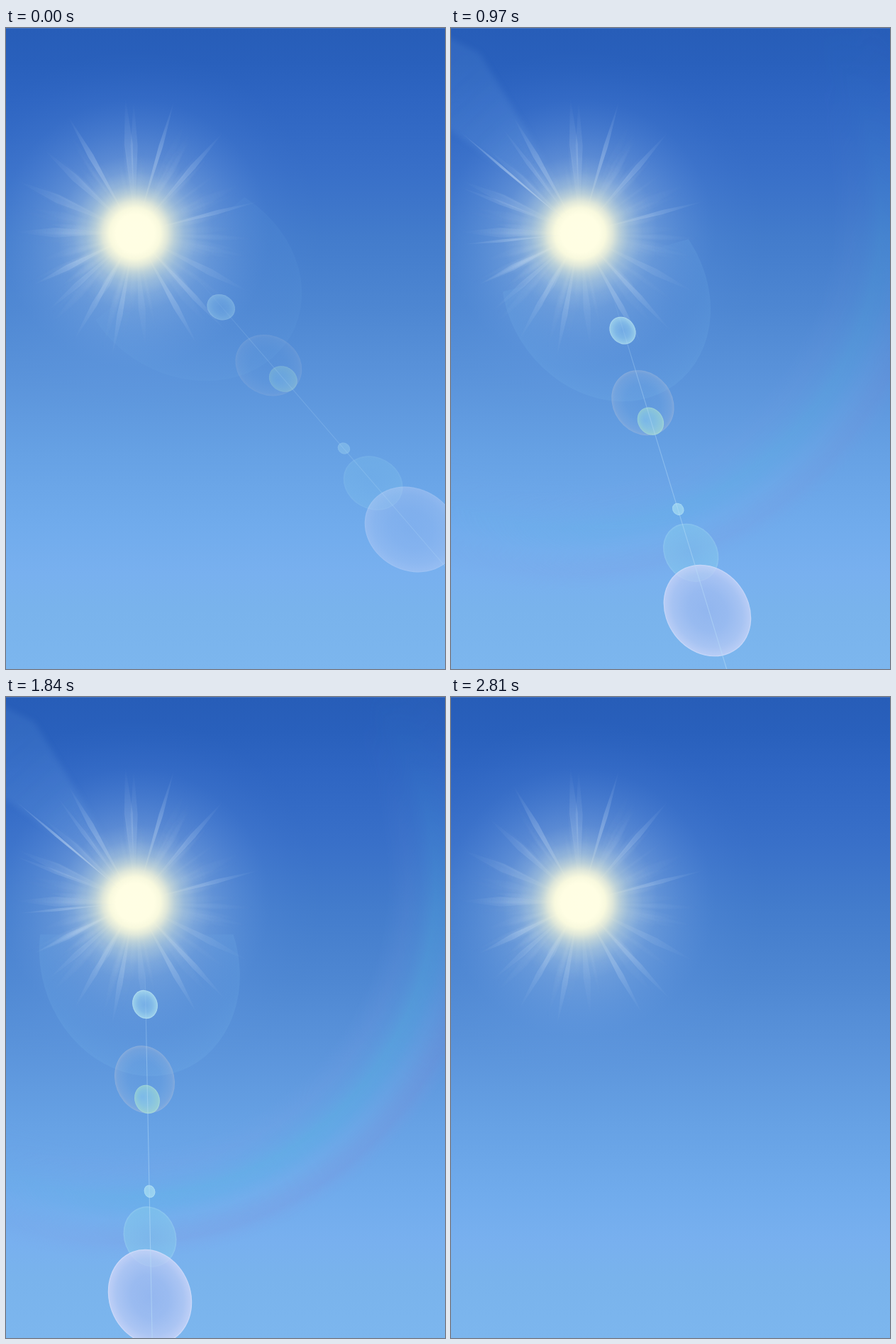
Animation of 619x905 px, one loop 4810 ms. Source, as an HTML page with a canvas:

```html
<!DOCTYPE html>
<html lang="en">
<head>
<meta charset="utf-8">
<title>Sun with lens flare</title>
<style>
  html, body { margin: 0; width: 100%; height: 100%; overflow: hidden; background: #5b94db; }
  canvas { display: block; }
</style>
</head>
<body>
<canvas id="stage" width="619" height="905"></canvas>
<script>
const W = 619, H = 905, LOOP = 4810, TAU = Math.PI * 2, DEG = Math.PI / 180;
const SUN = { x: 182, y: 290 };
const PIVOT = { x: 194.3, y: 265.3 };
const ctx = document.getElementById('stage').getContext('2d');

// Flare poses: start time and opacity; each turns a little further round the pivot.
const POSES = [
  [0, .42], [330, .56], [660, .72], [970, .88], [1270, .95],
  [1570, .95], [1870, .8], [2170, .6], [2480, .42], [2810, 0]
];
const STEP = 7.92, FIRST = -39.6, TILT = -21;
const BOW = { x: 165, y: 265, start: 790, peak: 1480, end: 2170 };

function layer(paint) {
  const c = document.createElement('canvas');
  c.width = W;
  c.height = H;
  paint(c.getContext('2d'));
  return c;
}

function addStops(gradient, stops, scale = 1) {
  for (const [at, color] of stops) gradient.addColorStop(at / scale, color);
  return gradient;
}

function seeded(seed) {
  return () => (seed = (seed * 16807) % 2147483647) / 2147483647;
}

function glow(g, radius, stops) {
  g.fillStyle = addStops(g.createRadialGradient(SUN.x, SUN.y, 0, SUN.x, SUN.y, radius), stops, radius);
  g.fillRect(0, 0, W, H);
}

// A spindle of light that leaves the sun and tapers to its tip.
function ray(g, angle, length, width, alpha) {
  const grad = g.createRadialGradient(0, 0, 0, 0, 0, length);
  addStops(grad, [
    [0, 'rgba(215,230,240,0)'],
    [.25, `rgba(215,230,240,${alpha * .6})`],
    [.55, `rgba(200,222,245,${alpha})`],
    [1, 'rgba(180,210,245,0)']
  ]);
  g.save();
  g.translate(SUN.x, SUN.y);
  g.rotate(angle);
  g.fillStyle = grad;
  g.beginPath();
  g.moveTo(25, 0);
  g.lineTo(length * .65, -width);
  g.lineTo(length, 0);
  g.lineTo(length * .65, width);
  g.fill();
  g.restore();
}

function rayTo(g, [x, y, width, alpha]) {
  const dx = x - SUN.x, dy = y - SUN.y;
  ray(g, Math.atan2(dy, dx), Math.hypot(dx, dy), width, alpha);
}

const sky = layer(g => {
  g.fillStyle = addStops(g.createLinearGradient(0, 0, 0, H), [
    [0, '#275db8'], [50, '#2960bc'], [100, '#2e65c2'], [200, '#386fc8'],
    [300, '#437ccc'], [400, '#4e87d2'], [500, '#5b94db'], [600, '#66a1e4'],
    [700, '#70abec'], [770, '#78b0ef'], [820, '#79b3ec'], [905, '#7cb6ee']
  ], H);
  g.fillRect(0, 0, W, H);
  g.fillStyle = 'rgba(255,255,255,.13)';
  g.fillRect(0, 0, W, 1);

  glow(g, 260, [
    [0, 'rgba(190,215,235,.55)'], [75, 'rgba(180,208,236,.44)'],
    [110, 'rgba(165,198,238,.32)'], [150, 'rgba(145,186,240,.19)'],
    [190, 'rgba(125,172,240,.07)'], [230, 'rgba(120,168,240,.02)'], [260, 'rgba(120,168,240,0)']
  ]);

  const rnd = seeded(4127);
  g.filter = 'blur(1px)';
  for (let i = 0; i < 80; i++) {
    ray(g, rnd() * TAU, 115 + rnd() * 65, 1.5 + rnd() * 6, .03 + rnd() * .07);
  }
  g.filter = 'blur(.6px)';
  [
    [86, 122, 4, .3], [238, 100, 3, .32], [308, 145, 4, .25], [168, 96, 6, .2], [180, 100, 5, .17],
    [360, 244, 3, .24], [36, 364, 4, .28], [56, 402, 4, .18], [94, 444, 4, .22], [149, 466, 4, .24],
    [197, 455, 5, .12], [271, 450, 4, .28], [312, 430, 4, .22], [14, 215, 6, .14], [10, 288, 7, .13],
    [52, 170, 5, .16], [345, 374, 5, .14], [120, 400, 5, .2]
  ].forEach(r => rayTo(g, r));
  g.filter = 'none';

  glow(g, 110, [
    [0, '#fffee4'], [27, '#fffee3'], [36, 'rgba(253,252,222,.96)'],
    [46, 'rgba(243,244,217,.82)'], [56, 'rgba(230,237,215,.58)'],
    [70, 'rgba(215,229,218,.31)'], [88, 'rgba(205,224,228,.1)'], [110, 'rgba(200,222,235,0)']
  ]);
});

const beams = layer(g => {
  const far = addStops(g.createLinearGradient(0, 70, 150, 240), [
    [0, 'rgba(105,160,225,.16)'], [.55, 'rgba(120,172,232,.18)'], [1, 'rgba(150,195,240,0)']
  ]);
  g.filter = 'blur(4px)';
  g.fillStyle = far;
  g.beginPath();
  g.moveTo(-10, 10);
  g.lineTo(40, 35);
  g.lineTo(155, 225);
  g.lineTo(130, 236);
  g.lineTo(-10, 138);
  g.fill();
  g.filter = 'blur(.5px)';
  [
    [10, 144, 1.8, .55], [70, 138, 3, .2], [12, 306, 2, .3],
    [8, 223, 3, .18], [36, 364, 2, .2]
  ].forEach(r => rayTo(g, r));
});

const rainbow = layer(g => {
  const { x, y } = BOW, inner = 370, outer = 530, span = outer - inner;
  g.fillStyle = addStops(g.createRadialGradient(x, y, inner, x, y, outer), [
    [0, 'rgba(120,165,235,0)'], [30, 'rgba(125,160,228,.3)'], [48, 'rgba(105,170,230,.36)'],
    [70, 'rgba(88,182,226,.68)'], [86, 'rgba(92,180,230,.62)'], [104, 'rgba(118,178,236,.5)'],
    [122, 'rgba(126,156,224,.55)'], [136, 'rgba(128,144,218,.48)'], [160, 'rgba(125,160,230,0)']
  ], span);
  g.beginPath();
  g.arc(x, y, outer, 0, TAU);
  g.arc(x, y, inner, 0, TAU, true);
  g.fill();
  // Fade both ends of the arc.
  g.globalCompositeOperation = 'destination-in';
  g.fillStyle = addStops(g.createConicGradient(-40 * DEG, x, y), [
    [0, 'rgba(0,0,0,0)'], [18, 'rgba(0,0,0,.15)'], [45, 'rgba(0,0,0,.8)'], [75, '#000'],
    [95, '#000'], [125, 'rgba(0,0,0,.85)'], [143, 'rgba(0,0,0,.4)'],
    [160, 'rgba(0,0,0,.08)'], [172, 'rgba(0,0,0,0)'], [360, 'rgba(0,0,0,0)']
  ], 360);
  g.fillRect(0, 0, W, H);
});

// Egg-shaped disc, shaded from a focus to its rim.
function blob(x, y, a, b, stops, focus = 0) {
  ctx.save();
  ctx.translate(x, y);
  ctx.rotate(TILT * DEG);
  ctx.scale(a, b);
  ctx.fillStyle = addStops(ctx.createRadialGradient(focus, focus, 0, 0, 0, 1), stops);
  ctx.beginPath();
  ctx.arc(0, 0, 1, 0, TAU);
  ctx.fill();
  ctx.restore();
}

function drawFlare(turn, opacity) {
  ctx.save();
  ctx.globalAlpha = opacity;
  ctx.translate(PIVOT.x, PIVOT.y);
  ctx.rotate(turn * DEG);

  // Wide halo, seen only on its far side.
  ctx.save();
  ctx.beginPath();
  ctx.rect(-200, 70, 400, 250);
  ctx.clip();
  blob(-6, 110, 138, 163, [
    [0, 'rgba(120,185,240,0)'], [.6, 'rgba(120,185,240,.02)'],
    [.96, 'rgba(125,190,240,.13)'], [1, 'rgba(130,195,240,.15)']
  ]);
  ctx.restore();

  blob(1.2, 274.7, 41.5, 48.5, [
    [0, 'rgba(150,190,230,.04)'], [.55, 'rgba(150,188,228,.1)'],
    [.9, 'rgba(158,185,222,.32)'], [.97, 'rgba(165,186,218,.46)'], [1, 'rgba(175,192,218,.6)']
  ]);
  blob(1.7, 168.7, 17.5, 20.5, [
    [0, 'rgba(135,195,240,.55)'], [.55, 'rgba(150,208,240,.66)'],
    [.92, 'rgba(172,224,240,.8)'], [1, 'rgba(195,235,244,.92)']
  ]);
  blob(4.7, 302.7, 17.5, 20.7, [
    [0, 'rgba(140,205,238,.6)'], [.55, 'rgba(148,212,226,.68)'],
    [.92, 'rgba(162,220,212,.74)'], [1, 'rgba(180,230,215,.85)']
  ], -.3);
  blob(8.2, 432.7, 7.7, 9, [
    [0, 'rgba(165,220,242,.75)'], [.85, 'rgba(170,223,243,.8)'], [1, 'rgba(195,235,248,.9)']
  ]);
  blob(8.7, 496.7, 36.5, 43.5, [
    [0, 'rgba(128,196,235,.5)'], [.94, 'rgba(136,204,236,.56)'], [1, 'rgba(160,214,242,.66)']
  ]);
  blob(8.7, 581.7, 57.7, 68.5, [
    [0, 'rgba(160,184,240,.72)'], [.45, 'rgba(168,190,242,.74)'], [.8, 'rgba(186,202,245,.8)'],
    [.97, 'rgba(203,212,248,.86)'], [1, 'rgba(220,226,252,.95)']
  ]);

  ctx.strokeStyle = addStops(ctx.createLinearGradient(0, 110, 0, 700), [
    [0, 'rgba(185,222,248,0)'], [.2, 'rgba(185,222,248,.4)'],
    [.5, 'rgba(185,222,248,.5)'], [1, 'rgba(185,222,248,.6)']
  ]);
  ctx.lineWidth = 1.1;
  ctx.beginPath();
  ctx.moveTo(1.5, 110);
  ctx.lineTo(13, 700);
  ctx.stroke();
  ctx.restore();
}

function bowStrength(t) {
  if (t < BOW.start || t >= BOW.end) return 0;
  const tick = BOW.start + Math.floor((t - BOW.start) / 30) * 30;
  return 1 - Math.abs(tick - BOW.peak) / (BOW.peak - BOW.start + 30);
}

function draw(t) {
  ctx.drawImage(sky, 0, 0);
  if (t >= 790 && t < 2290) ctx.drawImage(beams, 0, 0);
  const strength = bowStrength(t);
  if (strength > 0) {
    ctx.globalAlpha = strength;
    ctx.drawImage(rainbow, 0, 0);
    ctx.globalAlpha = 1;
  }
  const k = POSES.findLastIndex(([start]) => t >= start);
  const opacity = POSES[k][1];
  if (opacity) drawFlare(FIRST + k * STEP, opacity);
}

function tick() {
  draw(performance.now() % LOOP);
  requestAnimationFrame(tick);
}
tick();
</script>
</body>
</html>
```
